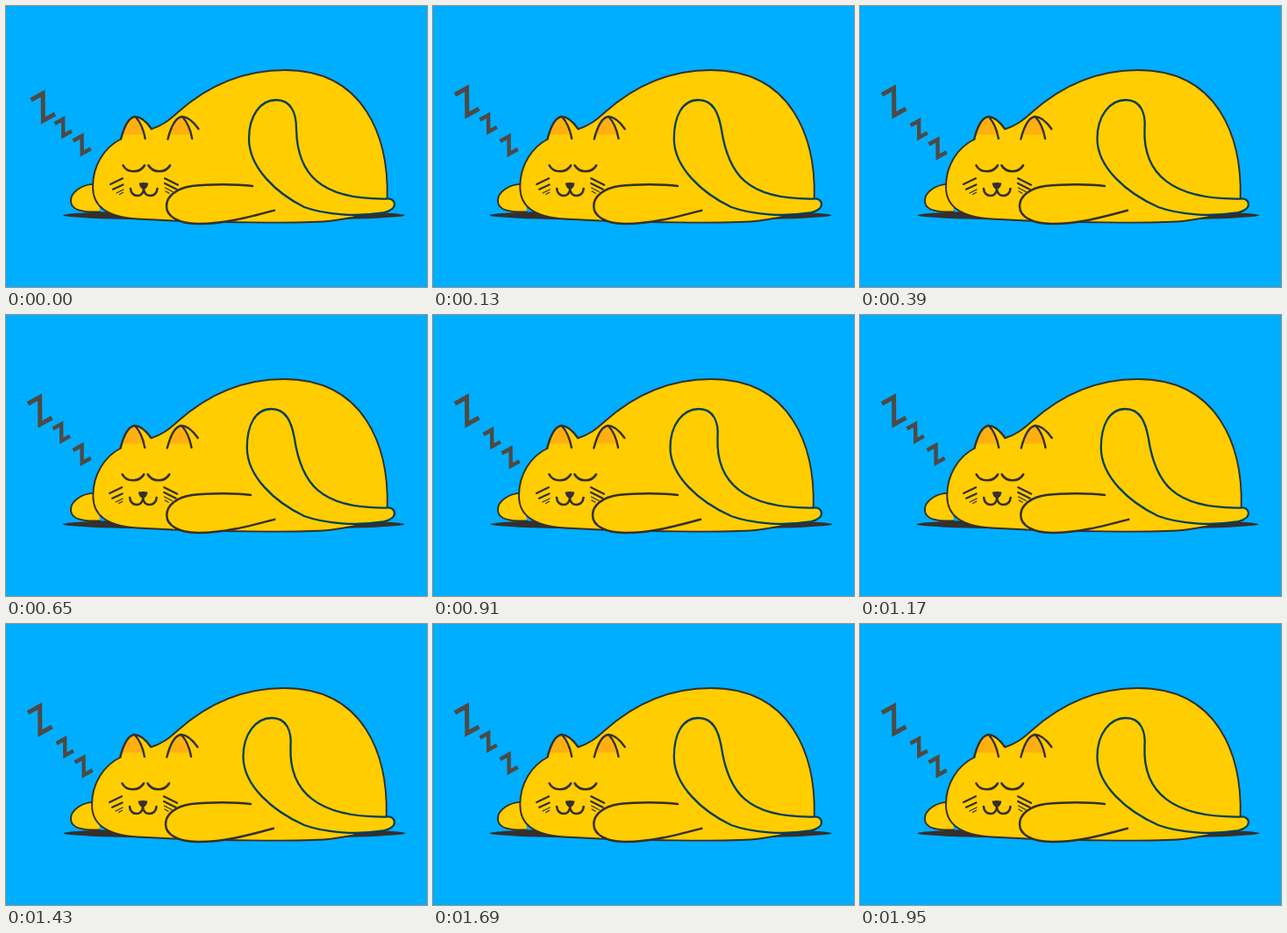
An HTML page for the animation above (2.08 s loop, 480x320 px).

```html
<!DOCTYPE html>
<html lang="en">
<head>
<meta charset="utf-8">
<title>Sleeping cat</title>
<style>
html, body { margin: 0; width: 100%; height: 100%; overflow: hidden; background: #00aeff; }
svg { display: block; width: 480px; height: 320px; }
</style>
</head>
<body>
<svg id="stage" viewBox="0 0 480 320" fill="none" stroke="#352f2d" stroke-width="1.9"
  stroke-linecap="round" stroke-linejoin="round">
  <rect width="480" height="320" fill="#00aeff" stroke="none"/>
  <ellipse id="shadow" cy="238.3" rx="195" ry="6" fill="#352f2d" stroke="none"/>
  <path d="M104 203C87 202 73 212 74 223C75 233 88 235 107 234.500" fill="#ffcd00"/>
  <path id="body" fill="#ffcd00"/>
  <g id="leftEar"></g>
  <g id="rightEar"></g>
  <path id="nearPaw" fill="#ffcd00" stroke-width="2.500"/>
  <g id="face" stroke-width="2.6">
    <path d="M133.500 181.500C138 190.500 153 190.500 158 181.500M162.500 181.500C167.500 190.500 182 190.500 187 181.500"/>
    <path d="M142 208C142.500 218.500 157 219 157 208C157 219 172 218.500 172.500 208"/>
    <path d="M152.500 202.300Q157 201 161.500 202.300Q160.500 207 157 208Q153.500 207 152.500 202.300Z" fill="#352f2d" stroke-width="1.5"/>
    <path d="M119 203L133 196.300M122 208.700L133.500 203.500M181 196.300L196 203.800M181 202L194.500 208.800" stroke-width="2.200"/>
    <path d="M126 213L134 209M129.500 214.500L133.500 212.300M181.500 207L190 211.500M182 211L186 213.200" stroke-width="1.300"/>
  </g>
  <path id="tail" fill="#ffcd00" stroke="#073e55" stroke-width="2.300"/>
  <g id="snore" stroke="#4c4a45" stroke-linecap="butt" stroke-linejoin="miter">
    <path stroke-width="5"/><path stroke-width="4.400"/><path stroke-width="4.400"/>
  </g>
</svg>
<script>
const STEP = 130, LOOP = 2080;
const $ = id => document.getElementById(id);
const setPath = (id, d) => $(id).setAttribute("d", d);
const shift = (id, x) => $(id).setAttribute("transform", `translate(${x} 0)`);

// tail, top: sway of the loop's sides and of its crown; peak: top of the back;
// side: right flank; z: left-top corner of each Z
const rest = { tail: 0, top: 0, peak: 0, side: .4, head: 0, ear: 0, face: 0, paw: 0, cuff: 0, ground: 0,
  z: [28.5, 107, 55.5, 134, 76.5, 153.5] };
const inhale = { tail: -2.2, top: -5.5, peak: -1.5, side: .5, head: .3, ear: -.5, face: -.8, paw: .3, cuff: -2, ground: -.5,
  z: [25, 101, 53.5, 129.5, 76.5, 154] };
const exhale = { tail: -6.5, top: -5, peak: -1, side: -.5, head: -1, ear: -.8, face: -1, paw: -1, cuff: -2, ground: .5,
  z: [25, 101, 57.5, 136, 78.5, 157.5] };

const mean = (a, b) => Array.isArray(a) ? a.map((v, i) => (v + b[i]) / 2) : (a + b) / 2;
const between = Object.fromEntries(Object.keys(rest).map(k => [k, mean(inhale[k], exhale[k])]));
const poses = [rest, inhale, between, exhale];

$("leftEar").innerHTML = $("rightEar").innerHTML = `
  <path d="M131 151.500C134 140 139 127 147 126C155 126 161 133 166 140L158 151Z" fill="#ffcd00" stroke="none"/>
  <path d="M133 146.500C136 137 140 127 147 126C152 131 156 139 157.500 146.500Z" fill="#ffb010" stroke="none"/>
  <path d="M131 151.500C134 140 139 127 147 126C155 126 161 133 166 140M147.500 126C153 132 157 141 158.700 151" stroke-width="2.400"/>`;

const zed = (x, y, w, h) =>
  `M${x} ${y}l${w} ${-w * .55}l${w * .02} ${h}l${w} ${-w * .55}`;

function draw(p) {
  const tx = x => x + p.tail;
  const cx = x => x + p.top;
  const hx = x => x + p.head;
  const px = x => x + p.paw;
  const bx = x => x + p.peak;
  const sx = x => x + p.side;
  const lean = 2 * (p.tail - p.top);

  $("shadow").setAttribute("cx", 260 + p.ground);
  setPath("body", `M131 151.500C${hx(112)} 161 ${hx(98.8)} 182 ${hx(99)} 206
    C${hx(99)} 228 114 240 150 242.500L190 244.500L250 246C300 246.500 345 248 372 244.500
    C390 242 400 240 410 237L430 230L${sx(434.2)} 219.500
    C${sx(436.2)} 150 409 73 ${bx(318)} 73C${bx(263)} 73 223 97 196 121C185 131 178 136 166 140`);
  shift("leftEar", p.ear);
  shift("rightEar", 53.5 + p.ear * 1.4);
  shift("face", p.face);
  setPath("nearPaw", `M${281 + p.cuff} 205C262 202.500 232 202.500 ${px(212)} 205
    C${px(194)} 207.500 ${px(183)} 217 ${px(183)} 228C${px(183)} 240 ${px(197)} 247.500 218 248
    C247 248.500 277 240.500 ${306 + p.paw} 232.800`);
  setPath("tail", `M430 235.500C400 240 365 238 340 229
    C${308 + p.tail * .6} 213 ${tx(277)} 184 ${tx(277)} 151
    C${tx(277)} 125 ${cx(290)} 107 ${cx(308)} 107C${cx(325)} 107 ${cx(331)} 122 ${tx(331)} 140
    C${tx(332) + lean} 191 ${358 + p.tail * .4} 221 434 219.500
    C440 219 443 222 443 226C443 231 438 233.500 430 235.500Z`);

  const [big, mid, low] = $("snore").children;
  const z = p.z;
  big.setAttribute("d", zed(z[0], z[1], 13.6, 31));
  mid.setAttribute("d", zed(z[2], z[3], 9.6, 19));
  low.setAttribute("d", zed(z[4], z[5], 10, 20));
}

let shown = -1;
function tick() {
  const step = Math.floor((performance.now() % LOOP) / STEP) % poses.length;
  if (step !== shown) draw(poses[shown = step]);
  requestAnimationFrame(tick);
}
tick();
</script>
</body>
</html>
```
